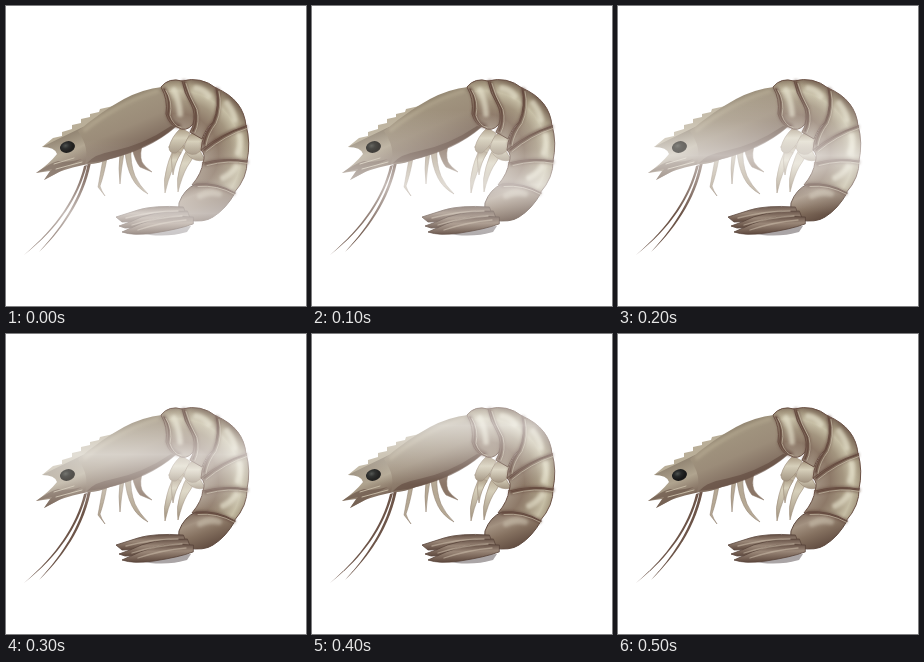
Recreate the animation shown at these times as an HTML page. Size 300 by 300 pixels, loop 600 ms.

```html
<!DOCTYPE html>
<html lang="en">
<head>
<meta charset="utf-8">
<title>Shrimp with a passing shine</title>
<style>
  html, body { margin: 0; width: 100%; height: 100%; overflow: hidden; background: #fff; }
  svg { display: block; width: 100vw; height: 100vh; }
</style>
</head>
<body>
<svg viewBox="0 0 300 300" stroke-linejoin="round" stroke-linecap="round">
  <defs>
    <linearGradient id="shell" gradientUnits="userSpaceOnUse" x1="96" y1="96" x2="122" y2="156">
      <stop offset="0" stop-color="#8c7f6a"/><stop offset=".22" stop-color="#a0937e"/>
      <stop offset=".5" stop-color="#9b8c79"/><stop offset=".76" stop-color="#877566"/>
      <stop offset="1" stop-color="#6b554a"/>
    </linearGradient>
    <linearGradient id="face" gradientUnits="userSpaceOnUse" x1="52" y1="130" x2="66" y2="164">
      <stop offset="0" stop-color="#8f8270"/><stop offset=".5" stop-color="#b0a48f"/>
      <stop offset="1" stop-color="#7b6759"/>
    </linearGradient>
    <radialGradient id="tail" gradientUnits="userSpaceOnUse" cx="172" cy="148" r="78">
      <stop offset=".3" stop-color="#a59686"/><stop offset=".52" stop-color="#8d7968"/>
      <stop offset=".68" stop-color="#a3957f"/><stop offset=".81" stop-color="#c6bea5"/>
      <stop offset=".9" stop-color="#a4977f"/><stop offset="1" stop-color="#735f50"/>
    </radialGradient>
    <linearGradient id="last" x1="0" y1="0" x2=".6" y2="1">
      <stop offset="0" stop-color="#715b4f"/><stop offset=".35" stop-color="#a39281"/>
      <stop offset=".62" stop-color="#84705f"/><stop offset="1" stop-color="#5c473c"/>
    </linearGradient>
    <linearGradient id="fan" x1="0" y1="0" x2=".1" y2="1">
      <stop offset="0" stop-color="#59443a"/><stop offset=".45" stop-color="#9a8778"/>
      <stop offset="1" stop-color="#5f4a3f"/>
    </linearGradient>
    <linearGradient id="limb" x1="0" y1="0" x2="0" y2="1">
      <stop offset="0" stop-color="#a6967f"/><stop offset=".4" stop-color="#d6cfba"/>
      <stop offset="1" stop-color="#a39582"/>
    </linearGradient>
    <radialGradient id="iris" cx=".4" cy=".35">
      <stop offset="0" stop-color="#4d514f"/><stop offset=".5" stop-color="#262828"/>
      <stop offset="1" stop-color="#181818"/>
    </radialGradient>
    <linearGradient id="glow" x1="0" y1="0" x2="0" y2="1">
      <stop offset="0" stop-color="#fff" stop-opacity="0"/>
      <stop offset=".3" stop-color="#fff" stop-opacity=".22"/>
      <stop offset=".56" stop-color="#fff" stop-opacity=".6"/>
      <stop offset=".78" stop-color="#fff" stop-opacity=".3"/>
      <stop offset="1" stop-color="#fff" stop-opacity="0"/>
    </linearGradient>
    <filter id="soft" x="-50%" y="-50%" width="200%" height="200%"><feGaussianBlur stdDeviation="1.8"/></filter>
    <g id="seams">
      <path d="M158 83Q165 94 162 108Q165 118 173 120"/>
      <path d="M178 76Q181 88 189 102Q192 115 187 125"/>
      <path d="M211 84Q215 101 208 116Q200 126 198 138"/>
      <path d="M239 121Q217 128 198 144"/>
      <path d="M240 156Q221 152 199 158"/>
      <path d="M227 187Q209 177 190 179"/>
    </g>
  </defs>

  <!-- ground shadow -->
  <path d="M130 226Q165 221 185 220L181 226Q164 231 144 229Z" fill="#aaa5a6"/>

  <!-- walking legs -->
  <g fill="#b5a894" stroke="#8a7869" stroke-width=".5">
    <path d="M97 153Q94 170 92 181L99 190Q95 184 94 180Q98 169 101 152Z"/>
    <path d="M114 148Q112 162 114 178Q115 164 118 147Z"/>
    <path d="M119 145Q120 160 126 172Q131 182 142 188Q133 179 129 170Q124 157 125 143Z"/>
    <path d="M126 142Q129 155 134 161L146 166Q138 160 136 156Q133 148 137 137Z" fill="#8b7667"/>
  </g>

  <!-- swimming legs -->
  <g fill="url(#limb)" stroke="#9a8a78" stroke-width=".6">
    <path d="M184 138Q177 149 174 161Q170 173 172 186Q176 170 181 161Q187 153 191 143Z"/>
    <path d="M172 135Q164 149 161 161Q157 173 159 187Q162 174 166 164Q171 153 179 140Z"/>
    <path d="M167 144Q164 153 167 169Q169 156 175 147Z"/>
    <path d="M181 148Q188 157 199 154Q195 145 188 138Z"/>
    <path d="M163 141Q166 130 175 122L184 127Q181 138 170 147Q163 148 163 141Z"/>
    <path d="M178 142Q180 132 186 127L198 132Q200 143 190 148Q181 150 178 142Z"/>
  </g>

  <!-- antennae -->
  <g fill="#6d5549">
    <path d="M78 160C71 190 51 221 18 249C54 221 73 190 81 159Z"/>
    <path d="M82 156C76 190 57 220 33 246C61 219 80 188 86 151Z"/>
  </g>

  <!-- rostrum -->
  <path d="M36 141L47 132L56 130L56 126L66 123L66 119L75 117L75 113L84 111L84 108L93 106L94 103L112 99L104 106L80 122L58 135Z" fill="#b9ae98"/>

  <!-- head and carapace -->
  <path d="M36 141Q56 131 77 121L92 128L82 158Q66 161 53 166L38 174L44 165L30 167Q43 158 51 148Q49 141 36 141Z" fill="url(#face)"/>
  <path d="M72 125Q96 105 118 93Q137 83 156 81Q162 91 161 107Q162 116 170 120Q158 131 143 138Q123 148 104 153Q91 159 79 158Q84 142 72 125Z" fill="url(#shell)"/>
  <path d="M81 157Q89 148 107 145Q137 139 165 120L170 121Q156 133 139 141Q108 155 81 157Z" fill="#664f44" opacity=".7"/>
  <path d="M30 167Q44 157 52 155Q62 157 76 153Q63 159 53 166L38 174L46 163Z" fill="#715c4f" opacity=".75"/>
  <path d="M48 158L68 152M50 163L76 156" fill="none" stroke="#c4b8a3" stroke-width="1"/>
  <path d="M79 124Q112 97 151 85" fill="none" stroke="#c4b99f" stroke-width="4" opacity=".4" filter="url(#soft)"/>

  <!-- abdomen -->
  <g fill="url(#tail)" stroke="#6b5246" stroke-width="1">
    <path d="M228 187Q242 171 241 154Q218 149 197 156Q196 167 186 179Q207 176 228 187Z"/>
    <path d="M241 155Q245 137 240 119Q215 127 195 144Q200 148 197 157Q219 151 241 155Z"/>
    <path d="M240 120Q238 94 210 82Q214 102 207 117Q196 128 195 144Q215 128 240 120Z"/>
    <path d="M210 82Q195 70 176 75Q179 88 187 103Q190 117 184 126L196 133Q200 122 207 116Q214 100 210 82Z"/>
    <path d="M176 75Q163 71 155 81Q162 93 160 108Q163 119 171 121Q180 127 187 118Q190 108 185 98Q178 87 176 75Z"/>
  </g>

  <!-- last segment -->
  <path d="M229 187Q220 203 207 211Q198 217 181 214Q171 208 173 197Q178 183 190 178Q211 176 229 187Z" fill="url(#last)" stroke="#604b40" stroke-width="1"/>

  <!-- shading along the joints, then gloss -->
  <use href="#seams" fill="none" stroke="#664c40" stroke-width="4.5" opacity=".75" filter="url(#soft)"/>
  <use href="#seams" fill="none" stroke="#664c40" stroke-width="1.2"/>
  <use href="#seams" fill="none" stroke="#d3cab4" stroke-width="1" opacity=".6" transform="translate(2 1.5)"/>
  <g fill="none" stroke="#e9e5d0" stroke-width="6" opacity=".6" filter="url(#soft)">
    <path d="M168 84Q173 94 174 108"/>
    <path d="M190 82Q198 83 203 90"/>
    <path d="M221 97Q228 106 229 114"/>
    <path d="M234 130Q235 139 232 147"/>
    <path d="M230 161Q225 168 217 172"/>
    <path d="M194 190Q203 185 213 188" opacity=".6"/>
  </g>

  <!-- tail fan -->
  <g fill="url(#fan)" stroke="#59443a" stroke-width=".8">
    <path d="M177 201Q148 199 132 204L110 211L116 216Q147 216 180 209Z"/>
    <path d="M181 205Q146 204 124 216L113 220L119 222Q154 222 184 213Z"/>
    <path d="M187 211Q157 208 134 218L116 226Q128 230 148 227Q174 223 187 218Z"/>
  </g>
  <path d="M120 212Q147 205 172 205M126 219Q152 211 176 210M132 224Q156 216 180 214" fill="none" stroke="#c6b7a5" stroke-width="1.3" opacity=".6"/>

  <rect id="shine" width="300" fill="url(#glow)"/>
  <ellipse id="eye" cx="61.5" cy="141" rx="7.6" ry="5.8" transform="rotate(-15 61.5 141)" fill="url(#iris)"/>
</svg>
<script>
  const STEP = 100, COUNT = 6, EYE_Y = 141;
  const ABOVE = 75, BELOW = 58;   // reach of the shine around its brightest line
  const shine = document.getElementById('shine');
  const eye = document.getElementById('eye');
  shine.setAttribute('height', ABOVE + BELOW);

  // The shine climbs in held steps and is gone on the last one.
  function draw(time) {
    const step = Math.floor(time / STEP) % COUNT;
    const lit = step < COUNT - 1 ? 1 : 0;
    const peak = 208 - 29 * step;
    const reach = EYE_Y < peak ? ABOVE : BELOW;
    const near = lit * Math.max(0, 1 - Math.abs(EYE_Y - peak) / reach);
    shine.setAttribute('y', peak - ABOVE);
    shine.setAttribute('opacity', lit);
    eye.setAttribute('opacity', 1 - 0.5 * near);
  }

  const start = performance.now();
  function tick() {
    draw(performance.now() - start);
    requestAnimationFrame(tick);
  }
  tick();
</script>
</body>
</html>
```
